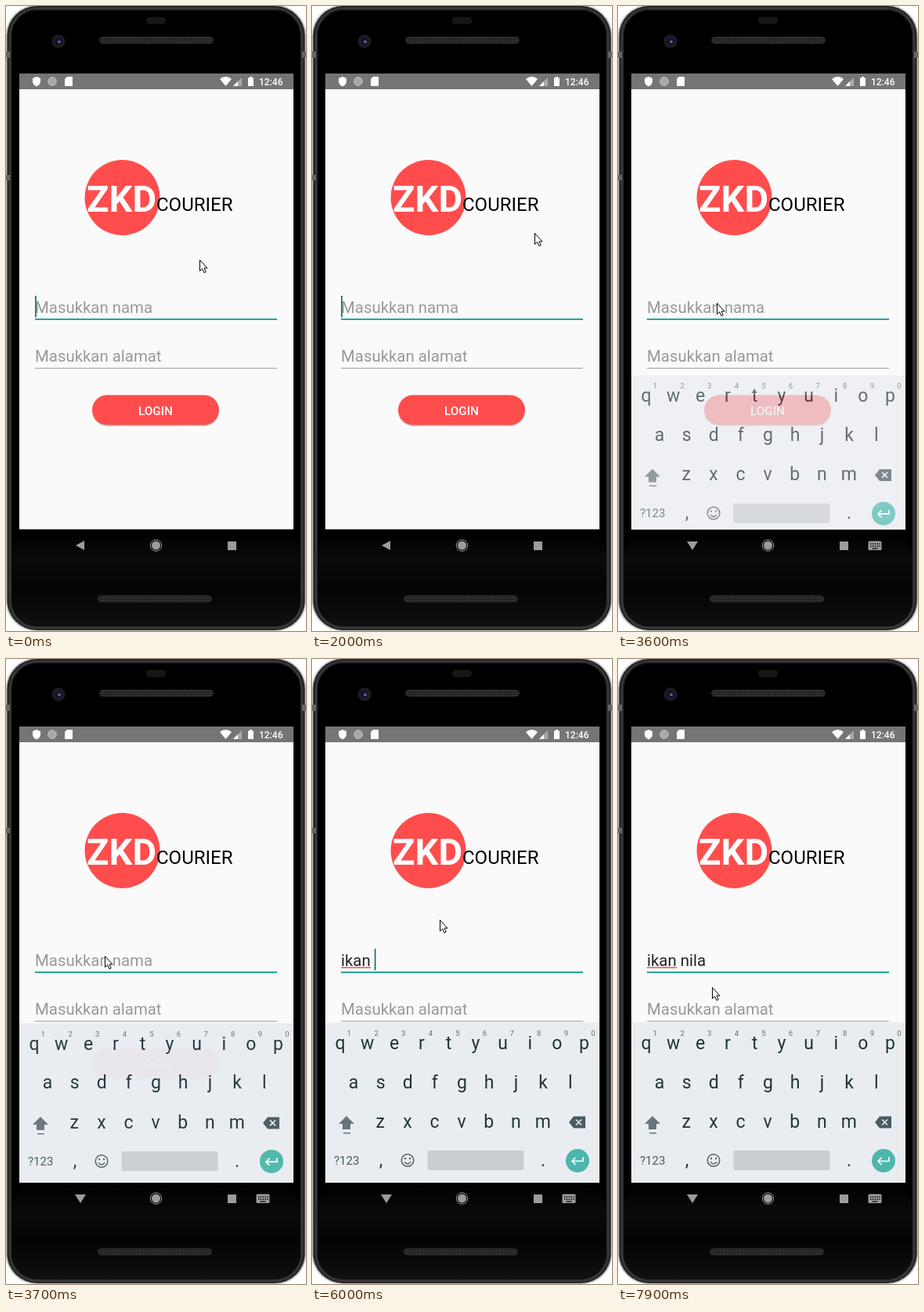
An HTML page for the animation above (8 s loop, 383 px wide and 796 px high).

```html
<!DOCTYPE html>
<html lang="id">
<head>
<meta charset="utf-8">
<title>Login</title>
<style>
html, body { margin: 0; width: 100%; height: 100%; overflow: hidden; background: #fff; }
svg { display: block; font-family: Roboto, sans-serif; }
text { white-space: pre; }
.mid { text-anchor: middle; }
.field { font-size: 20.4px; }
.hint { fill: #999; }
</style>
</head>
<body>
<svg width="383" height="796" viewBox="0 0 383 796">
  <defs>
    <linearGradient id="chin" x2="0" y2="1">
      <stop offset="0"/><stop offset=".3" stop-color="#0a0a0a"/>
      <stop offset=".6" stop-color="#040404"/><stop offset="1" stop-color="#101010"/>
    </linearGradient>
    <pattern id="mesh" width="3" height="3" patternUnits="userSpaceOnUse">
      <path fill="#222" d="M0 0h3v3H0z"/><circle cx="1.5" cy="1.5" r=".8" fill="#444"/>
    </pattern>
    <filter id="soft"><feGaussianBlur stdDeviation="1"/></filter>
    <clipPath id="screen"><path d="M17 86h350v581H17z"/></clipPath>
  </defs>

  <!-- Phone body -->
  <rect x=".5" y="-.5" width="382" height="796" rx="38" fill="#888" filter="url(#soft)"/>
  <rect x="1.500" y="0" width="380" height="795" rx="38" fill="#1c1c1c"/>
  <rect x="5" y="3" width="373" height="789" rx="35" stroke="#4a4a4a" stroke-width="2" filter="url(#soft)"/>
  <rect x="8" y="668" width="367" height="122" rx="32" fill="url(#chin)"/>
  <path d="M0 58h5v8H0zM378 58h5v8h-5zM0 215h5v7H0z" fill="#666"/>
  <rect x="179" y="14" width="25" height="9" rx="4" fill="#161616"/>
  <g fill="url(#mesh)" stroke="#2a2a2a">
    <rect x="119.500" y="39.500" width="145" height="8" rx="4"/>
    <rect x="117.500" y="751" width="145" height="8" rx="4"/>
  </g>
  <circle cx="67" cy="45" r="8.500" fill="#1d1d20"/>
  <circle cx="67" cy="45" r="5" fill="#15132c"/>
  <circle cx="68" cy="45.500" r="1.800" fill="#6b66a8"/>

  <!-- Screen -->
  <path d="M17 86h350v580.600H17z" fill="#fafafa"/>
  <path d="M17 86h350v20H17z" fill="#757575"/>
  <g fill="#fff">
    <path d="M39 90l5 2v4q0 4-5 6.500q-5-2.500-5-6.500v-4z"/>
    <circle cx="59" cy="96" r="5.300" fill="#a8a8a8" stroke="#c4c4c4"/>
    <path d="M78 90h6q1 0 1 1v10q0 1-1 1h-8q-1 0-1-1v-8z"/>
    <path d="M273 93q7.500-6 15 0l-7.500 9z"/>
    <path d="M301 91v11h-11z" fill="#aaa"/>
    <path d="M296 96v6h-6z"/>
    <path d="M311 90h3v1.500h2v10.500h-7V91.500h2z"/>
    <text x="323" y="100.500" font-size="12" font-weight="500">12:46</text>
  </g>

  <circle cx="148.500" cy="244" r="48" fill="#ff4d4d"/>
  <text class="mid" x="147.500" y="262" font-size="47" font-weight="700" fill="#fff">ZKD</text>
  <text x="192" y="261" font-size="24">COURIER</text>

  <text id="hint" class="field hint" x="37" y="391">Masukkan nama</text>
  <text id="typed" class="field" x="37" y="391" fill="#212121"></text>
  <path id="spell" d="M37 393h38" stroke="#f05050" stroke-width="1.500"/>
  <path d="M37 399h309" stroke="#26a69a" stroke-width="2"/>
  <path id="caret" d="M.9 369v27.500" stroke="#00796b" stroke-width="1.700"/>
  <text class="field hint" x="37" y="453">Masukkan alamat</text>
  <path d="M37 461.300h309" stroke="#999"/>

  <rect x="110" y="498" width="162" height="37.500" rx="18.750" fill="#000" opacity=".12"/>
  <rect x="110.500" y="497" width="161" height="37.500" rx="18.750" fill="#000" opacity=".2"/>
  <rect x="110" y="495.500" width="162" height="38" rx="19" fill="#ff4d4d"/>
  <text class="mid" x="191" y="520.500" font-size="15.300" font-weight="500" fill="#fff">LOGIN</text>

  <!-- Keyboard -->
  <g clip-path="url(#screen)">
    <g id="keyboard">
      <path d="M17 463h350v240H17z" fill="#e9edf1"/>
      <g id="keys" class="mid" fill="#20343c" font-size="23"></g>
      <path d="M44 582l10 10h-5v7H39v-7h-5zM40 603h9v1.500h-9z" fill="#66757c"/>
      <path d="M334 582.500h15v15h-15l-6-7.500z" fill="#4a5a62"/>
      <path d="M337 586.500l7 7m0-7l-7 7" stroke="#e9edf1" stroke-width="1.600"/>
      <text x="28" y="644" font-size="15" fill="#455a64">?123</text>
      <g fill="none" stroke="#546067" stroke-width="1.500">
        <circle cx="122" cy="638.500" r="7.800"/>
        <path d="M118 640.500q4 5 8 0"/>
        <path d="M119 635v2.200m6-2.200v2.200" stroke-width="2"/>
      </g>
      <rect x="147.500" y="626" width="123" height="25" rx="2" fill="#c9ced2"/>
      <circle cx="339" cy="639" r="15" fill="#4db6ac"/>
      <path d="M346 634.500v5h-14m4.500-4.500l-4.500 4.500l4.500 4.500" fill="none" stroke="#fff" stroke-width="1.700"/>
    </g>
  </g>

  <!-- Navigation bar -->
  <g fill="#9c9c9c">
    <path id="back" d="M89 687l11-6v12z"/>
    <circle cx="191.500" cy="687" r="5.500"/>
    <circle cx="191.500" cy="687" r="7.200" fill="none" stroke="#9c9c9c"/>
    <path d="M283 682h11v11h-11z"/>
    <g id="open">
      <path d="M88 682h14l-7 11z"/>
      <rect x="319.500" y="681.500" width="17" height="11.500" rx="1.500"/>
      <path d="M322 685h13m-13 3h13" stroke="#000" stroke-width="1.500" stroke-dasharray="1.500 1.300"/>
      <path d="M324.500 691h7" stroke="#000" stroke-width="1.200"/>
    </g>
  </g>

  <path id="mouse" d="M.5.5v14l3.100-2.800l2.300 5l2.300-1l-2.200-4.800h4z" fill="#fff" stroke="#000"/>
</svg>
<script>
const $ = id => document.getElementById(id);
const LOOP = 8000, STEP = 100;

// Pointer stops: time, x, y
const path = [
  [0, 247, 323], [300, 247, 323], [750, 212, 308], [1200, 243, 297], [1600, 272, 301],
  [2000, 284, 289], [2700, 284, 289], [3100, 126, 378], [3700, 126, 378],
  [4100, 163, 332], [7400, 163, 332], [7900, 120, 418], [8000, 120, 418]
];
const typing = [
  [0, ""], [5400, "ik"], [5600, "ika"], [6000, "ikan "],
  [6400, "ikan ni"], [6700, "ikan nil"], [7000, "ikan nila"]
];
// Times at which the caret turns on and off
const caretOn = [[0, 400], [900, 1400], [1900, 2400], [2900, 3500], [4000, 4500], [5000, 7500]];

function addKey(label, x, y, style = "") {
  $("keys").insertAdjacentHTML("beforeend", `<text x="${x}" y="${y}" ${style}>${label}</text>`);
}
function addRow(letters, x, y) {
  [...letters].forEach((c, i) => addKey(c, x + i * 34.6, y));
}
addRow("qwertyuiop", 36, 497);
addRow("asdfghjkl", 53, 546.5);
addRow("zxcvbnm", 87.3, 597);
[..."1234567890"].forEach((c, i) =>
  addKey(c, 47.5 + i * 34.6, 480, 'font-size="9.5" fill="#607078"'));
addKey(",", 88, 646);
addKey(".", 295, 646);

function show(id, on) {
  $(id).setAttribute("visibility", on ? "visible" : "hidden");
}
function move(id, x, y) {
  $(id).setAttribute("transform", `translate(${x} ${y})`);
}

function draw(t) {
  const n = path.findIndex(p => p[0] > t);
  const [t0, x0, y0] = path[n - 1], [t1, x1, y1] = path[n];
  const k = (t - t0) / (t1 - t0);
  move("mouse", Math.round(x0 + (x1 - x0) * k), Math.round(y0 + (y1 - y0) * k));

  const text = typing.filter(e => e[0] <= t).pop()[1];
  $("typed").textContent = text;
  show("hint", !text);
  show("spell", text.length > 4);
  show("caret", caretOn.some(([a, b]) => t >= a && t < b));
  move("caret", 37 + (text ? $("typed").getComputedTextLength() : 0), 0);

  const rest = (1 - Math.min(1, Math.max(0, (t - 3500) / 300))) ** 3;
  $("keyboard").setAttribute("opacity", 1 - rest);
  move("keyboard", 0, 25 * rest);
  show("open", t > 3500);
  show("back", t <= 3500);
}

const start = performance.now();
function tick() {
  const t = (performance.now() - start) % LOOP;
  draw(Math.floor(t / STEP) * STEP);
  requestAnimationFrame(tick);
}
tick();
</script>
</body>
</html>
```
